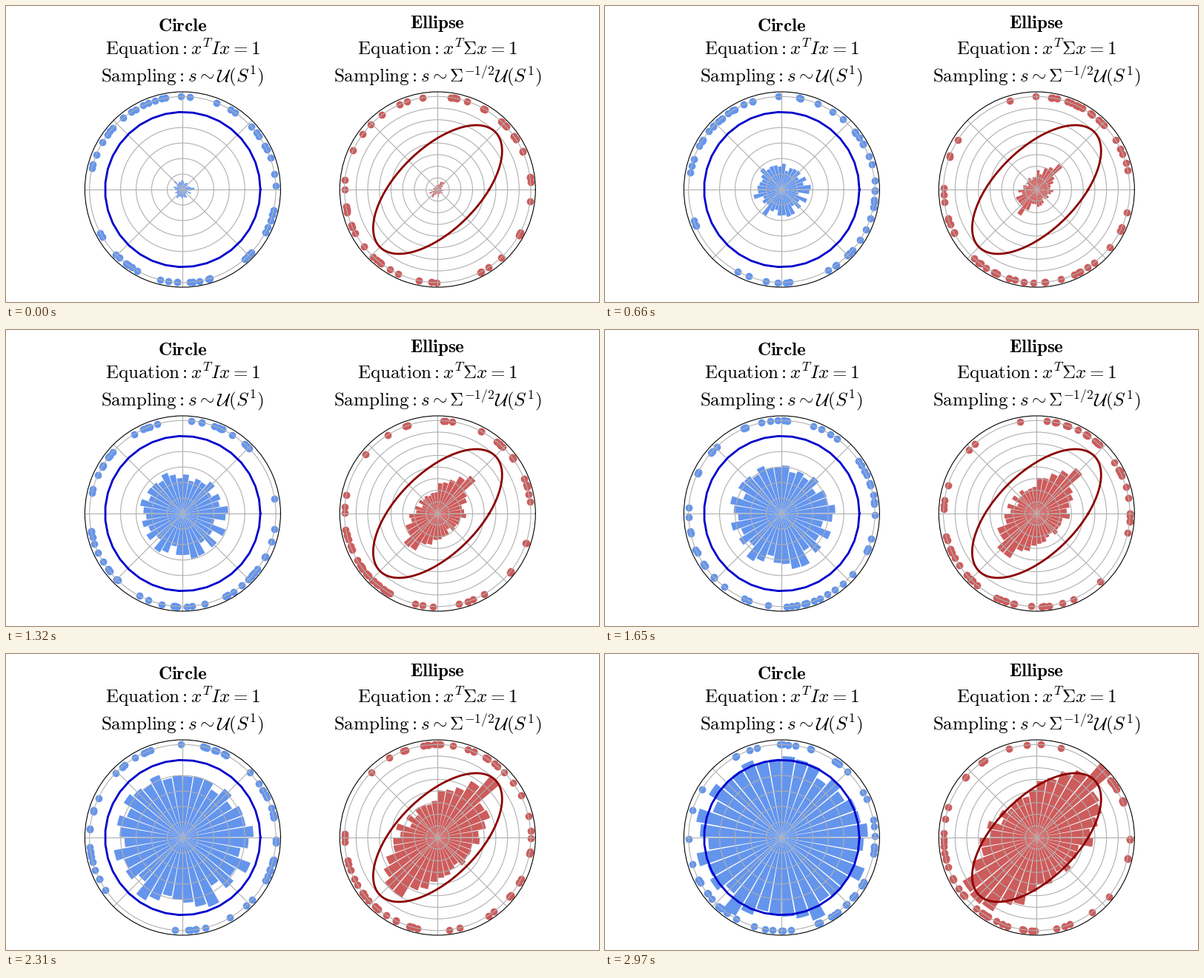
Animation, 800 px wide and 400 px high, one loop 3300 ms. Source, as a matplotlib script:

```python
import numpy as np
import matplotlib.pyplot as plt
from matplotlib.animation import FuncAnimation

W, H, DPI = 800, 400, 100
FRAMES, INTERVAL = 10, 330
BINS, DOTS = 36, 58
RADIUS, CENTER_Y = 132, 152
LONG_AXIS, SHORT_AXIS = 1.4, 0.7
TILT = np.pi / 4

plt.rcParams["mathtext.fontset"] = "cm"

bin_width = 2 * np.pi / BINS
bin_centers = (np.arange(BINS) + 0.5) * bin_width


def circle_radius(theta):
    return np.ones_like(theta)


def ellipse_radius(theta):
    t = theta - TILT
    return 1 / np.hypot(np.cos(t) / LONG_AXIS, np.sin(t) / SHORT_AXIS)


def circle_angles(rng):
    return rng.uniform(0, 2 * np.pi, DOTS)


def ellipse_angles(rng):
    """Uniform circle samples stretched along the diagonal axes."""
    t = rng.uniform(0, 2 * np.pi, DOTS)
    return np.arctan2(SHORT_AXIS * np.sin(t), LONG_AXIS * np.cos(t)) + TILT


def bar_heights(rng, radius):
    """Each frame adds a noisy tenth of the curve radius to every bar."""
    steps = rng.gamma(20, 1 / 20, (FRAMES, BINS))
    return radius(bin_centers) * np.cumsum(steps, axis=0) / FRAMES


class Panel:
    def __init__(self, fig, center_x, titles, fill, stroke, radius, angles,
                 dot_radius, curve_points, seed):
        rng = np.random.default_rng(seed)
        self.heights = bar_heights(rng, radius)
        self.angles = [angles(rng) for _ in range(FRAMES)]
        self.dot_radii = np.full(DOTS, dot_radius)

        box = [(center_x - RADIUS) / W, (CENTER_Y - RADIUS) / H,
               2 * RADIUS / W, 2 * RADIUS / H]
        ax = fig.add_axes(box, projection="polar")
        ax.set_yticks(np.arange(0.2, dot_radius + 0.01, 0.2))
        ax.set_xticklabels([])
        ax.set_yticklabels([])

        self.bars = ax.bar(bin_centers, self.heights[0],
                           width=0.9 * bin_width, color=fill)
        self.dots = ax.scatter(self.angles[0], self.dot_radii, s=36,
                               color=fill)
        theta = np.linspace(0, 2 * np.pi, curve_points)
        ax.plot(theta, radius(theta), color=stroke, lw=2)
        ax.set_ylim(0, dot_radius * 1.05)

        for text, baseline in titles:
            fig.text(center_x / W, 1 - baseline / H, text, fontsize=18,
                     ha="center", va="baseline")

    def draw(self, frame):
        for bar, height in zip(self.bars, self.heights[frame]):
            bar.set_height(height)
        self.dots.set_offsets(
            np.column_stack([self.angles[frame], self.dot_radii]))
        return [*self.bars, self.dots]


fig = plt.figure(figsize=(W / DPI, H / DPI), dpi=DPI, facecolor="white")

panels = [
    Panel(
        fig, 238.4,
        [(r"$\mathbf{Circle}$", 34),
         (r"$\mathrm{Equation}: x^T I x = 1$", 66),
         (r"$\mathrm{Sampling}: s \sim \mathcal{U}(S^1)$", 102)],
        "cornflowerblue", "mediumblue", circle_radius, circle_angles,
        dot_radius=1.2, curve_points=36, seed=3),
    Panel(
        fig, 582.3,
        [(r"$\mathbf{Ellipse}$", 30),
         (r"$\mathrm{Equation}: x^T \Sigma x = 1$", 66),
         (r"$\mathrm{Sampling}: s \sim \Sigma^{-1/2}\mathcal{U}(S^1)$", 102)],
        "indianred", "darkred", ellipse_radius, ellipse_angles,
        dot_radius=1.6, curve_points=200, seed=8),
]


def update(frame):
    return [artist for panel in panels for artist in panel.draw(frame)]


anim = FuncAnimation(fig, update, frames=FRAMES, interval=INTERVAL,
                     init_func=lambda: update(0), repeat=True, repeat_delay=0)
plt.show()
```
